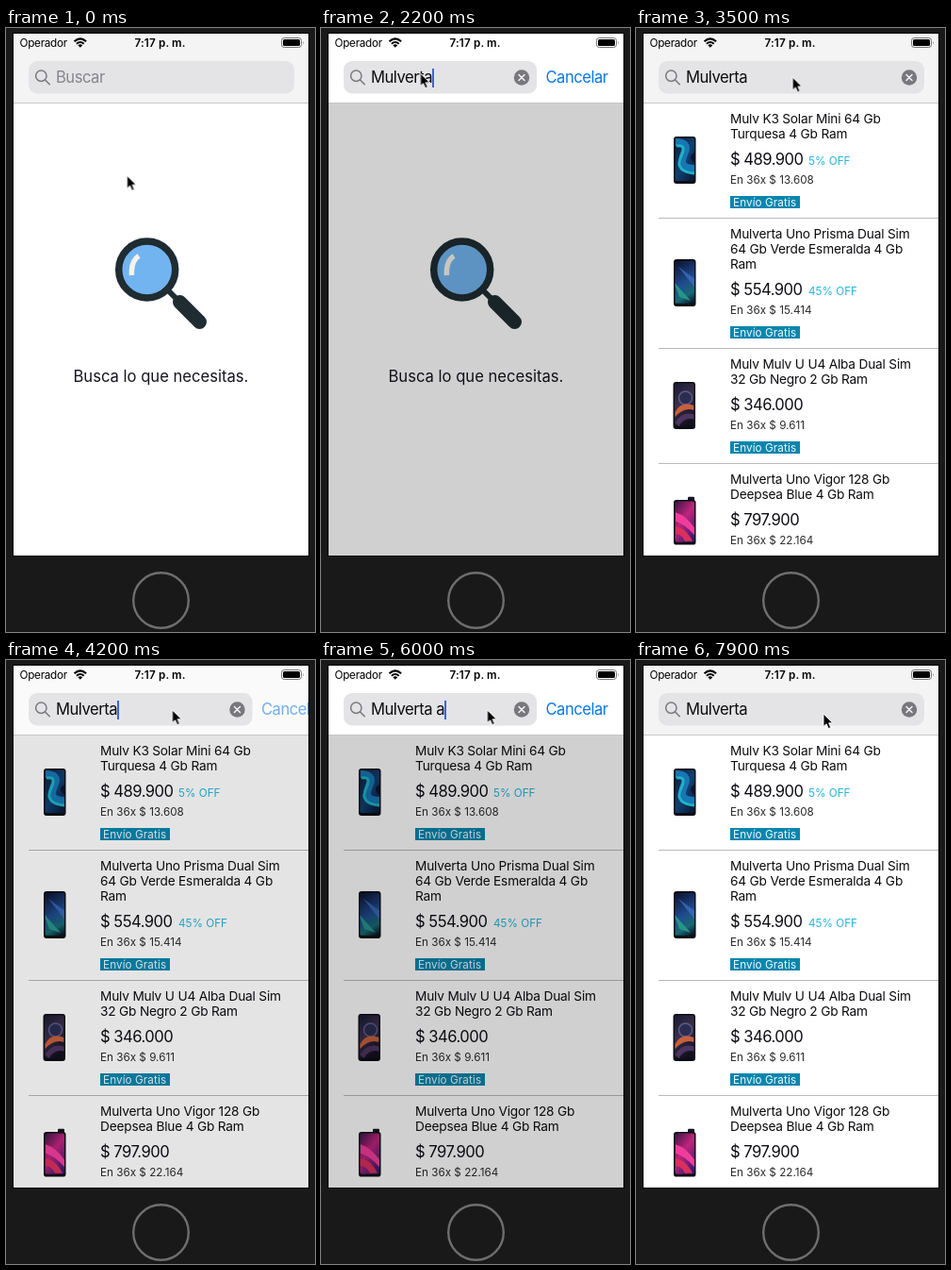
These frames come from a looping animation (328x640 px, 8 s). An HTML page:

```html
<!DOCTYPE html>
<html lang="es">
<head>
<meta charset="utf-8">
<title>Buscador</title>
<style>
  /* --focus: search bar focus, 0 to 1. --typed: number of letters shown. */
  @property --focus { syntax: "<number>"; inherits: true; initial-value: 0; }
  @property --typed { syntax: "<number>"; inherits: true; initial-value: 0; }

  html, body { margin: 0; width: 328px; height: 640px; overflow: hidden; background: #191919; }
  #stage {
    position: relative; width: 328px; height: 640px; overflow: hidden;
    font-family: Inter, "Liberation Sans", sans-serif;
    animation: focus 8s infinite ease-in-out, typed 8s infinite step-end;
  }
  svg { position: absolute; left: 0; top: 0; display: block; }

  .status { font-size: 11.7px; letter-spacing: -.25px; }
  .clock { font-weight: 600; letter-spacing: .15px; }
  .body { font-size: 16.6px; fill: #14141f; }
  .title { font-size: 13.7px; letter-spacing: -.2px; fill: #0c0c10; }
  .price { font-size: 16.6px; letter-spacing: -.5px; fill: #0c0c14; }
  .small { font-size: 11.7px; fill: #2a2a2c; }
  .off { font-size: 11.7px; fill: #22b5da; }
  .badge rect { fill: #0a86ad; }
  .badge text { font-size: 11.7px; letter-spacing: .1px; fill: #eefaff; }
  .rule { stroke: #b9b9bb; }

  #list { animation: list 8s infinite step-end; }
  #dim { opacity: calc(.185 * var(--focus)); }
  #white { opacity: var(--focus); }
  #field { width: calc(282px - 77px * var(--focus)); }
  #clear, #cancel { transform: translateX(calc(-77px * var(--focus))); }
  #clear { opacity: min(1, var(--typed)); }
  #cancel { opacity: var(--focus); }
  #cancel text { font-size: 16.6px; letter-spacing: -.5px; fill: #0a78e4; animation: press 8s infinite; }

  #query, #hint {
    position: absolute; left: 53px; top: 35px; height: 35px;
    font-size: 16.6px; line-height: 35px; letter-spacing: -.03em; white-space: pre; color: #0c0c0e;
  }
  #hint { color: #85858a; opacity: calc(1 - min(1, var(--typed))); }
  #query i { font-style: normal; font-size: calc(16.6px * clamp(0, var(--typed) - var(--i), 1)); }
  #caret {
    position: absolute; top: 8px; width: 2px; height: 20px; background: #3b66d6;
    animation: caret 8s infinite step-end;
  }
  #pointer { animation: pointer 8s infinite ease-in-out; }

  @keyframes focus {
    0%, 8.75% { --focus: 0; }
    13.125%, 32.5% { --focus: 1; }
    36.875%, 50.125% { --focus: 0; }
    54.5%, 91.1% { --focus: 1; }
    95.475%, 100% { --focus: 0; }
  }
  @keyframes typed {
    0% { --typed: 0; }
    15% { --typed: 1; }
    16.5% { --typed: 2; }
    18% { --typed: 3; }
    19.5% { --typed: 4; }
    21% { --typed: 5; }
    22.5% { --typed: 6; }
    24% { --typed: 7; }
    25.5% { --typed: 8; }
    69% { --typed: 9; }
    71% { --typed: 10; }
    91%, 100% { --typed: 8; }
  }
  @keyframes list {
    0% { visibility: hidden; }
    33.75%, 100% { visibility: visible; }
  }
  @keyframes caret {
    0% { opacity: 0; }
    9% { opacity: 1; }
    32.5% { opacity: 0; }
    50.5% { opacity: 1; }
    58.75% { opacity: 0; }
    64% { opacity: 1; }
    91%, 100% { opacity: 0; }
  }
  @keyframes press {
    0%, 89.5% { opacity: 1; }
    90.5%, 96% { opacity: .5; }
    97%, 100% { opacity: 1; }
  }
  @keyframes pointer {
    0%, 1.25% { transform: translate(128.5px, 156.5px); }
    7.5%, 37.5% { transform: translate(105.5px, 48px); }
    46%, 80% { transform: translate(176.5px, 53px); }
    88.75%, 93% { transform: translate(263px, 50px); }
    98%, 100% { transform: translate(199px, 57px); }
  }
</style>
</head>
<body>
<div id="stage">
  <svg width="328" height="640" viewBox="0 0 328 640">
    <defs>
      <clipPath id="screen"><rect x="8" y="6" width="313" height="553"/></clipPath>
      <clipPath id="glass"><rect x="1.500" y="1.500" width="20.500" height="45.500" rx="2"/></clipPath>
      <linearGradient id="teal" x1="0" y1="0" x2="1" y2="1">
        <stop offset="0" stop-color="#0b1630"/><stop offset=".5" stop-color="#123f72"/><stop offset="1" stop-color="#081226"/>
      </linearGradient>
      <linearGradient id="green" x1=".3" y1="0" x2=".6" y2="1">
        <stop offset="0" stop-color="#0d1430"/><stop offset=".5" stop-color="#1f4a8e"/><stop offset=".8" stop-color="#176a72"/><stop offset="1" stop-color="#0a1a2c"/>
      </linearGradient>
      <linearGradient id="dusk" x1="0" y1="0" x2=".4" y2="1">
        <stop offset="0" stop-color="#14182c"/><stop offset=".5" stop-color="#3c2f4c"/><stop offset="1" stop-color="#12101e"/>
      </linearGradient>
      <linearGradient id="pink" x1="0" y1="0" x2=".7" y2="1">
        <stop offset="0" stop-color="#2a1440"/><stop offset=".5" stop-color="#c0247c"/><stop offset="1" stop-color="#3a1a70"/>
      </linearGradient>
      <g id="tag" class="badge">
        <rect x="100" y="61" width="74" height="13"/>
        <text x="103" y="71.600">Envío Gratis</text>
      </g>
      <path id="line" class="rule" d="M24 84.500H321"/>
      <rect id="case" width="23.500" height="50" rx="3" fill="#0c0e14"/>
    </defs>

    <rect width="328" height="640" fill="#191919"/>
    <rect x="7.500" y="5.500" width="314" height="554" fill="none" stroke="#050505"/>
    <circle cx="164.500" cy="606.500" r="29.300" fill="none" stroke="#6e6e6e" stroke-width="2.400"/>

    <g clip-path="url(#screen)">
      <rect x="8" y="6" width="313" height="553" fill="#fff"/>

      <g id="empty">
        <path d="M170 276L184 290" stroke="#1f2c32" stroke-width="6"/>
        <path d="M184.500 290.500L205.500 311.500" stroke="#1f2c32" stroke-width="15" stroke-linecap="round"/>
        <circle cx="149.700" cy="256" r="30" fill="#72b4ef" stroke="#1f2c32" stroke-width="7.500"/>
        <path d="M133.500 262Q132.500 247 141 241.500" fill="none" stroke="#f5f3ec" stroke-width="5.500"/>
        <text class="body" x="71.500" y="374.500">Busca lo que necesitas.</text>
      </g>

      <g id="list">
        <rect x="8" y="80" width="313" height="479" fill="#fff"/>

        <g transform="translate(0 117)">
          <text class="title" x="100" y="-16">Mulv K3 Solar Mini 64 Gb</text>
          <text class="title" x="100">Turquesa 4 Gb Ram</text>
          <text class="price" x="100" y="27.500">$ 489.900</text>
          <text class="off" x="183" y="27.500">5% OFF</text>
          <text class="small" x="100" y="48">En 36x $ 13.608</text>
          <use href="#tag"/><use href="#line"/>
        </g>
        <g transform="translate(0 255)">
          <text class="title" x="100" y="-32">Mulverta Uno Prisma Dual Sim</text>
          <text class="title" x="100" y="-16">64 Gb Verde Esmeralda 4 Gb</text>
          <text class="title" x="100">Ram</text>
          <text class="price" x="100" y="27.500">$ 554.900</text>
          <text class="off" x="183" y="27.500">45% OFF</text>
          <text class="small" x="100" y="48">En 36x $ 15.414</text>
          <use href="#tag"/><use href="#line"/>
        </g>
        <g transform="translate(0 377)">
          <text class="title" x="100" y="-16">Mulv Mulv U U4 Alba Dual Sim</text>
          <text class="title" x="100">32 Gb Negro 2 Gb Ram</text>
          <text class="price" x="100" y="27.500">$ 346.000</text>
          <text class="small" x="100" y="48">En 36x $ 9.611</text>
          <use href="#tag"/><use href="#line"/>
        </g>
        <g transform="translate(0 499)">
          <text class="title" x="100" y="-16">Mulverta Uno Vigor 128 Gb</text>
          <text class="title" x="100">Deepsea Blue 4 Gb Ram</text>
          <text class="price" x="100" y="27.500">$ 797.900</text>
          <text class="small" x="100" y="48">En 36x $ 22.164</text>
          <use href="#tag"/>
        </g>

        <g transform="translate(40 115)">
          <use href="#case"/>
          <g clip-path="url(#glass)">
            <rect width="24" height="49" fill="url(#teal)"/>
            <path d="M2 6Q16 6 12 16T9 28Q10 34 24 34" fill="none" stroke="#1677b4" stroke-width="8"/>
            <path d="M3 10Q13 8 9 18T6 30Q8 38 22 39" fill="none" stroke="#1fb2c4" stroke-width="3"/>
            <path d="M24 16Q12 22 24 29Z" fill="#0a1430"/>
          </g>
        </g>
        <g transform="translate(40 245)">
          <use href="#case"/>
          <g clip-path="url(#glass)">
            <rect width="24" height="49" fill="url(#green)"/>
            <path d="M5 8L24 32V22Z" fill="#3c6cc0" opacity=".8"/>
            <path d="M0 24L18 44L6 40Z" fill="#2a9a8c" opacity=".9"/>
          </g>
        </g>
        <g transform="translate(39.500 375)">
          <use href="#case"/>
          <g clip-path="url(#glass)">
            <rect width="24" height="49" fill="url(#dusk)"/>
            <circle cx="13" cy="17" r="7" fill="#2c2c50" stroke="#5a5c8c" stroke-width="1.500"/>
            <path d="M2 32Q8 20 22 25V30Q12 26 2 37Z" fill="#c8603c"/>
            <path d="M2 43Q10 30 24 35V40Q12 36 6 47Z" fill="#4c3560"/>
          </g>
        </g>
        <g transform="translate(40 500) scale(1 .95)">
          <rect x="15" y="-3.500" width="7" height="6" rx="1" fill="#15131f"/>
          <use href="#case"/>
          <g clip-path="url(#glass)">
            <rect width="24" height="49" fill="url(#pink)"/>
            <path d="M2 14Q14 18 24 34V42Q14 28 2 24Z" fill="#f03d9c"/>
            <path d="M2 30Q12 30 20 46H12Q8 38 2 38Z" fill="#d8305c"/>
          </g>
        </g>
      </g>

      <rect id="dim" x="8" y="80" width="313" height="479"/>

      <rect x="8" y="6" width="313" height="74" fill="#f4f4f5"/>
      <rect id="white" x="8" y="6" width="313" height="74" fill="#fff"/>
      <path d="M8 79.500H321" stroke="#c6c6c8"/>

      <text class="status" x="14.500" y="20">Operador</text>
      <text class="status clock" x="136.500" y="20">7:17 p. m.</text>
      <g fill="none" stroke="#000" stroke-width="2">
        <path d="M72.500 14.200Q78.800 8.500 85.100 14.200"/>
        <path d="M74.900 16.800Q78.800 13.300 82.700 16.800"/>
      </g>
      <path d="M76.400 18.200Q78.800 16.200 81.200 18.200L78.800 20.700Z"/>
      <rect x="292.500" y="10.500" width="21" height="10" rx="2.800" fill="none" stroke="#77777a"/>
      <rect x="294" y="12" width="18" height="7" rx="1.500"/>
      <path d="M315 14V17.500Q316.600 15.750 315 14" fill="#77777a"/>

      <rect id="field" x="24" y="35" height="34.500" rx="9" fill="#e4e4e7"/>
      <g fill="none" stroke="#77777c" stroke-width="1.500" stroke-linecap="round">
        <circle cx="37.300" cy="50.700" r="5.700"/>
        <path d="M41.500 55L46.300 59.700"/>
      </g>
      <g id="clear">
        <circle cx="290" cy="52.500" r="8.200" fill="#78787c"/>
        <path d="M287 49.500l6 6m0-6l-6 6" stroke="#f4f4f5" stroke-width="1.500" stroke-linecap="round"/>
      </g>
      <g id="cancel"><text x="315.500" y="57.500">Cancelar</text></g>
    </g>
  </svg>

  <div id="hint">Buscar</div>
  <div id="query"><i style="--i:0">M</i><i style="--i:1">u</i><i style="--i:2">l</i><i style="--i:3">v</i><i style="--i:4">e</i><i style="--i:5">r</i><i style="--i:6">t</i><i style="--i:7">a</i><i style="--i:8"> </i><i style="--i:9">a</i><span id="caret"></span></div>

  <svg width="328" height="640" viewBox="0 0 328 640">
    <path id="pointer" d="M0 0V13.500L3.100 10.700L5.300 15.600L7.700 14.500L5.600 9.800H9.800Z" stroke="#fff" stroke-width=".9"/>
  </svg>
</div>
</body>
</html>
```
